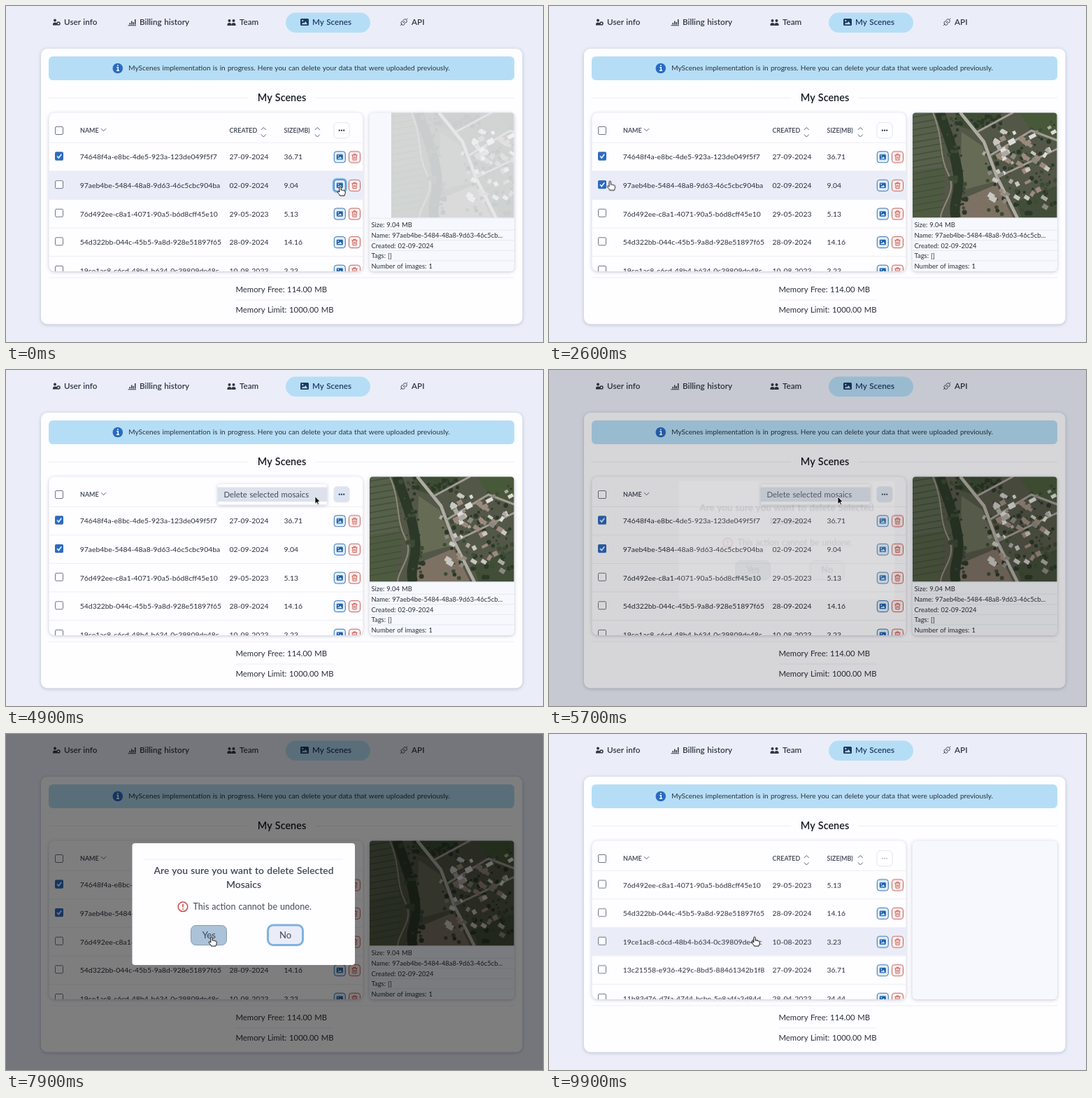
An HTML page for the animation above (10000 ms loop, 768x480 px).

```html
<!DOCTYPE html>
<html lang="en">
<head>
<meta charset="utf-8">
<title>Imagery table</title>
<style>
  html, body { margin: 0; width: 100%; height: 100%; overflow: hidden; background: #ebeef8; }
  svg { display: block; width: 768px; height: 480px; }
  text { font-family: Lato, "Open Sans", sans-serif; fill: #2a303a; word-spacing: .06em; }
  .tab { font-size: 11.7px; font-weight: 600; fill: #2f3744; }
  .on { fill: #1f3a63; }
  .banner { font-size: 10.05px; text-anchor: end; }
  .title { font-size: 14.45px; font-weight: 600; text-anchor: middle; fill: #161a22; }
  .head { font-size: 9px; font-weight: 600; fill: #39414f; }
  .cell { font-size: 10.4px; }
  .mem { font-size: 11.35px; }
  .info { font-size: 9.45px; }
  .ask { font-size: 13.9px; font-weight: 600; text-anchor: middle; fill: #3e4655; }
  .note { font-size: 12.6px; fill: #444c5a; }
  .btn { font-size: 13.1px; text-anchor: middle; fill: #3e4655; }
  .item { font-size: 11.4px; fill: #434c5b; }
  .line { fill: none; stroke: #edeef3; }
  .icon { fill: #2f3744; }
  .sort { fill: none; stroke: #4b5361; stroke-width: .9; }
  .card { filter: drop-shadow(0 1px 2.5px #1e285a40); }

  /* One percent is 100 ms */
  .flip { animation: 10s step-end infinite; }
  .hover1 { animation-name: hover1; }
  .hover2 { animation-name: hover2; }
  .hover3 { animation-name: hover3; }
  .tick0 { animation-name: untilDelete; }
  .tick1 { animation-name: tick1; }
  .focus { animation-name: focus; }
  .untilDelete { animation-name: untilDelete; }
  .afterDelete { animation-name: afterDelete; }
  .untilShift { animation-name: untilShift; }
  .list { animation-name: list; }
  .opened { animation-name: opened; }
  .noRing { animation-name: noRing; }
  .yesRing { animation-name: yesRing; }
  .hand { animation-name: hand; }
  .arrow { animation-name: arrow; }
  .beam { animation-name: beam; }
  .photo { animation: photo 10s infinite; }
  .menu { animation: menu 10s linear infinite; }
  .fade { animation: fade 10s infinite; }
  .pop { animation: pop 10s infinite; transform-origin: 340px 243px; }
  .cursor { animation: move 10s ease-in-out infinite; }

  @keyframes hover1 { 0% { opacity: 0 } 11.5% { opacity: 1 } 16.9% { opacity: 0 } 28% { opacity: 1 } 31.3%, 100% { opacity: 0 } }
  @keyframes hover2 { 0% { opacity: 1 } 11.5% { opacity: 0 } 16.9% { opacity: 1 } 28%, 100% { opacity: 0 } }
  @keyframes hover3 { 0% { opacity: 0 } 88%, 100% { opacity: 1 } }
  @keyframes tick1 { 0% { opacity: 0 } 21% { opacity: 1 } 85%, 100% { opacity: 0 } }
  @keyframes focus { 0% { opacity: 1 } 21%, 100% { opacity: 0 } }
  @keyframes untilDelete { 0% { opacity: 1 } 85%, 100% { opacity: 0 } }
  @keyframes afterDelete { 0% { opacity: 0 } 85%, 100% { opacity: 1 } }
  @keyframes untilShift { 0% { opacity: 1 } 91%, 100% { opacity: 0 } }
  @keyframes list { 0% { transform: none } 91%, 100% { transform: translateY(-81.2px) } }
  @keyframes opened { 0% { opacity: 0 } 41% { opacity: 1 } 59%, 100% { opacity: 0 } }
  @keyframes noRing { 0% { opacity: 0 } 59% { opacity: 1 } 84%, 100% { opacity: 0 } }
  @keyframes yesRing { 0% { opacity: 0 } 84%, 100% { opacity: 1 } }
  @keyframes hand { 0% { opacity: 1 } 45% { opacity: 0 } 69%, 100% { opacity: 1 } }
  @keyframes arrow { 0% { opacity: 0 } 45% { opacity: 1 } 62%, 100% { opacity: 0 } }
  @keyframes beam { 0% { opacity: 0 } 62% { opacity: 1 } 69%, 100% { opacity: 0 } }
  @keyframes photo {
    0% { opacity: .22; transform: translateX(31px); animation-timing-function: ease-out }
    5% { opacity: 1; transform: none; animation-timing-function: step-end }
    85%, 100% { opacity: 0; transform: none }
  }
  @keyframes menu { 0%, 41% { opacity: 0 } 43%, 57.5% { opacity: 1 } 59%, 100% { opacity: 0 } }
  @keyframes fade {
    0%, 56.4% { opacity: 0; animation-timing-function: ease-out }
    59.4%, 84.8% { opacity: 1; animation-timing-function: ease-in }
    87.8%, 100% { opacity: 0 }
  }
  @keyframes pop {
    0%, 56.2% { opacity: 0; transform: scale(.95); animation-timing-function: ease-out }
    59.2%, 84.8% { opacity: 1; transform: none; animation-timing-function: ease-in }
    87.8%, 100% { opacity: 0; transform: scale(.95) }
  }
  @keyframes move {
    0%, 5% { transform: translate(478px, 258px) }
    14%, 16% { transform: translate(93px, 231px) }
    19%, 25% { transform: translate(77px, 252px) }
    34%, 45% { transform: translate(490px, 180px) }
    52%, 59% { transform: translate(413px, 181px) }
    64%, 66% { transform: translate(355px, 249px) }
    73%, 100% { transform: translate(294px, 290px) }
  }
</style>
</head>
<body>
<svg viewBox="0 0 768 480">
  <defs>
    <clipPath id="tableClip"><rect x="61" y="152" width="449.5" height="227" rx="8"/></clipPath>
    <clipPath id="photoClip"><path d="M520 302.5V157q0-4.500 4.500-4.500H722q4.500 0 4.500 4.500V302.500Z"/></clipPath>
    <g id="picture">
      <path d="M1.500 0H10.500Q12 0 12 1.500V8.500Q12 10 10.500 10H1.500Q0 10 0 8.500V1.500Q0 0 1.500 0ZM1.800 8.200H10.200L7.400 4 5.200 6.800 3.900 5.600ZM3.300 1.800A1.100 1.100 0 1 0 3.310 1.800Z" fill-rule="evenodd"/>
    </g>
    <g id="person"><circle cx="3" cy="2" r="2"/><path d="M0 9V7.500Q0 5 3 5T6 7.500V9Z"/></g>
    <g id="sort"><path class="sort" d="M-3.500-1.500 0-5 3.500-1.500M-3.500 5 0 8.500 3.500 5"/></g>
  </defs>

  <rect width="768" height="480" fill="#ebeef8"/>

  <!-- Tabs -->
  <rect x="400" y="9.500" width="121" height="28.500" rx="14.250" fill="#b5def6"/>
  <g class="icon">
    <use href="#person" x="67" y="18.500"/>
    <circle cx="75" cy="25" r="2" fill="none" stroke="#2f3744" stroke-width="1.500"/>
    <path d="M174.500 27.300H186V28.300H174.500ZM176.500 24H178V26.500H176.500ZM179 21.500H180.500V26.500H179ZM181.500 23H183V26.500H181.500ZM184 19H185.500V26.500H184Z"/>
    <use href="#person" x="316.500" y="19"/>
    <use href="#person" x="322.500" y="19"/>
    <use href="#picture" x="421" y="18" fill="#1f3a63"/>
    <path d="M564 28 566.500 25.500M566.500 21.500 570.500 25.500 569 27Q567.500 28 566 26.500T565.200 23ZM568 20.500 569.500 19Q571 18 572.500 19.500T573 23L571.600 24.100ZM572.500 19.500 574.300 17.700" fill="none" stroke="#2f3744" stroke-width=".9"/>
  </g>
  <text class="tab" x="83" y="27.200">User info</text>
  <text class="tab" x="191" y="27.200">Billing history</text>
  <text class="tab" x="334" y="27.200">Team</text>
  <text class="tab on" x="438" y="27.200">My Scenes</text>
  <text class="tab" x="580" y="27.200">API</text>

  <!-- Page card -->
  <rect class="card" x="50" y="61" width="688.500" height="393.500" rx="9" fill="#fefdff"/>
  <rect x="61" y="72" width="666" height="34" rx="6" fill="#b5def6"/>
  <circle cx="159.800" cy="89" r="7.300" fill="#2a6bc2"/>
  <path d="M159 85H160.800M158.300 87.800H160.300V92M158 92.200H162" fill="none" stroke="#fff" stroke-width="1.400"/>
  <text class="banner" x="635" y="92.400">MyScenes implementation is in progress. Here you can delete your data that were uploaded previously.</text>
  <path class="line" d="M61 131.500H346M443 131.500H727M61 388H727M329 420H468"/>
  <text class="title" x="394.500" y="136.300">My Scenes</text>
  <text class="mem" x="328.500" y="409">Memory Free: 114.00 MB</text>
  <text class="mem" x="328.500" y="438">Memory Limit: 1000.00 MB</text>

  <!-- Table -->
  <rect class="card" x="61.500" y="152.500" width="449" height="226.500" rx="8" fill="#fefdff"/>
  <g clip-path="url(#tableClip)">
    <g fill="#eaedf8">
      <rect class="flip hover1" x="61" y="195.500" width="450" height="40"/>
      <rect class="flip hover2" x="61" y="236" width="450" height="40"/>
      <rect class="flip hover3" x="61" y="276.500" width="450" height="40"/>
    </g>
    <path class="line" d="M61 195.200H511M61 235.800H511M61 276.400H511M61 317H511M61 357.600H511"/>
    <svg x="0" y="195" width="768" height="185" viewBox="0 195 768 185"><g id="rows" class="flip list"></g></svg>
    <rect x="70.500" y="172.500" width="11" height="11" rx="1.500" fill="#fff" stroke="#6e7684"/>
    <text class="head" x="106" y="181">NAME</text>
    <path class="sort" d="M136 175.200 139.500 178.700 143 175.200"/>
    <text class="head" x="319.500" y="181">CREATED</text>
    <use href="#sort" x="368.300" y="178.500"/>
    <text class="head" x="397.500" y="181">SIZE(MB)</text>
    <use href="#sort" x="445.300" y="178.500"/>
    <rect x="469" y="166.700" width="22" height="22" rx="4.500" fill="#fff" stroke="#e1e4ec"/>
    <rect class="flip opened" x="469" y="166.700" width="22" height="22" rx="4.500" fill="#dde4f1"/>
    <g fill="#b4b8c1"><circle cx="476.800" cy="177.700" r="1"/><circle cx="480" cy="177.700" r="1"/><circle cx="483.200" cy="177.700" r="1"/></g>
    <g class="flip untilDelete" fill="#2b3340"><circle cx="476.800" cy="177.700" r="1.100"/><circle cx="480" cy="177.700" r="1.100"/><circle cx="483.200" cy="177.700" r="1.100"/></g>
  </g>

  <!-- Preview -->
  <rect class="card" x="519.500" y="152.500" width="207.500" height="226.500" rx="6" fill="#f6f8fd"/>
  <g clip-path="url(#photoClip)"><g id="photo" class="photo"></g></g>
  <g class="flip untilShift">
    <path class="line" style="stroke:#e4e9f1" d="M520 303H727M520 320.200H727M520 334.800H727M520 349.400H727M520 364H727"/>
    <text class="info" x="522.500" y="316.300">Size: 9.04 MB</text>
    <text class="info" x="522.500" y="330.900">Name: 97aeb4be-5484-48a8-9d63-46c5cb...</text>
    <text class="info" x="522.500" y="345.500">Created: 02-09-2024</text>
    <text class="info" x="522.500" y="360">Tags: []</text>
    <text class="info flip untilDelete" x="522.500" y="374.600">Number of images: 1</text>
    <text class="info flip afterDelete" x="522.500" y="374.600">Number of images: 0</text>
  </g>

  <!-- Menu -->
  <g class="menu">
    <rect class="card" x="303" y="163" width="156" height="29.500" rx="3" fill="#fefdff"/>
    <rect x="303" y="167.500" width="156" height="20.500" fill="#dce1ec"/>
    <text class="item" x="311.500" y="181.800">Delete selected mosaics</text>
  </g>

  <!-- Dialog -->
  <rect class="fade" width="768" height="480" fill="#000" fill-opacity=".5"/>
  <g class="fade"><g class="pop">
    <rect x="180.500" y="156" width="318.500" height="174" rx="4" fill="#fefdff"/>
    <path class="line" d="M197 179H482"/>
    <text class="ask" x="340" y="199.800">Are you sure you want to delete Selected</text>
    <text class="ask" x="340" y="220.300">Mosaics</text>
    <circle cx="253" cy="246.800" r="6.800" fill="none" stroke="#c4514a" stroke-width="1.500"/>
    <path d="M253 242.800V247.800M253 249.300V250.900" stroke="#c4514a" stroke-width="1.600"/>
    <text class="note" x="267.500" y="251">This action cannot be undone.</text>
    <rect x="264.500" y="273.500" width="51" height="28" rx="7" fill="#abc2d8" stroke="#8a9bb0"/>
    <rect class="flip yesRing" x="264.500" y="273" width="52" height="28.500" rx="7.500" fill="none" stroke="#6fa8da" stroke-width="2.600"/>
    <text class="btn" x="290.300" y="291.500">Yes</text>
    <rect x="374.500" y="273.500" width="50" height="28" rx="7" fill="#eaedf8" stroke="#a6acb9"/>
    <rect class="flip noRing" x="374.500" y="273" width="50" height="28.500" rx="7.500" fill="none" stroke="#7fb2e0" stroke-width="3"/>
    <text class="btn" x="399.500" y="291.500">No</text>
  </g></g>

  <!-- Pointer -->
  <g class="cursor">
    <path class="flip hand" d="M-1.200 1.200C-1.200-.600 1.200-.600 1.200 1.200V5.200C1.600 4.400 3.300 4.500 3.400 5.600 4 4.900 5.400 5.100 5.500 6.200 6.200 5.700 7.200 6.100 7.200 7.200V9.500C7.200 11 6 11.600 6 13H-.500C-.600 11.600-3 9.500-3.800 8-4.300 6.900-3 6.200-2.200 7L-1.200 8Z" fill="#fff" stroke="#111"/>
    <path class="flip arrow" d="M0 0V10.500L2.400 8.300 3.900 11.700 5.600 11 4.100 7.600H7.300Z" fill="#000" stroke="#fff" stroke-width=".8"/>
    <path class="flip beam" d="M-2.500-6Q0-6 0-4.500 0-6 2.500-6M0-4.500V4.500M-2.500 6Q0 6 0 4.500 0 6 2.500 6M-1.400 1.200H1.400" fill="none" stroke="#111"/>
  </g>
</svg>
<script>
  const mosaics = [
    ["74648f4a-e8bc-4de5-923a-123de049f5f7", "27-09-2024", "36.71"],
    ["97aeb4be-5484-48a8-9d63-46c5cbc904ba", "02-09-2024", "9.04"],
    ["76d492ee-c8a1-4071-90a5-b6d8cff45e10", "29-05-2023", "5.13"],
    ["54d322bb-044c-45b5-9a8d-928e51897f65", "28-09-2024", "14.16"],
    ["19ce1ac8-c6cd-48b4-b634-0c39809de48c", "10-08-2023", "3.23"],
    ["13c21558-e936-429c-8bd5-88461342b1f8", "27-09-2024", "36.71"],
    ["11b83d76-d7fa-4744-bcbe-5e8a4fa3d84d", "28-04-2023", "34.44"],
  ];

  const tick = i => `<g class="flip tick${i}">
    <rect x="70" y="-7" width="12" height="12" rx="2" fill="#2a6bc2"/>
    <path d="M73-1 75.300 1.500 79.300-3.700" fill="none" stroke="#fff" stroke-width="1.500"/></g>`;
  const ring = `<rect class="flip focus" x="468.300" y="-8.700" width="18" height="18" rx="4.500"
    fill="none" stroke="#7db4e6" stroke-width="3"/>`;

  const row = ([name, date, size], i) => `<g transform="translate(0 ${215.5 + 40.6 * i})">
    <rect x="70.500" y="-6.500" width="11" height="11" rx="1.500" fill="#fff" stroke="#6e7684"/>
    ${i < 2 ? tick(i) : ""}
    <text class="cell" x="105.800" y="3.800">${name}</text>
    <text class="cell" x="319.500" y="3.800">${date}</text>
    <text class="cell" x="397.500" y="3.800">${size}</text>
    ${i === 1 ? ring : ""}
    <rect x="469.300" y="-7.700" width="16" height="16" rx="3.500" fill="#e2effa" stroke="#2f6fb3"/>
    <use href="#picture" transform="translate(472.800 -3.500) scale(.75)" fill="#1f5fa8"/>
    <rect x="490.500" y="-7.700" width="16" height="16" rx="3.500" fill="#fdf0ef" stroke="#c4605a"/>
    <path d="M494.500-2.500H502.500M497-2.500V-4H500V-2.500M495.500-2.500 496 4.500H501L501.500-2.500M497.700-.500V2.700M499.300-.500V2.700"
      fill="none" stroke="#c0504a" stroke-width=".9"/></g>`;
  document.getElementById("rows").innerHTML = mosaics.map(row).join("");

  // Aerial view in flat shapes
  let seed = 11;
  const rnd = (a, b) => a + (b - a) * ((seed = (seed * 16807) % 2147483647) / 2147483647);
  const many = (n, make) => Array.from({ length: n }, (_, i) => make(i)).join("");
  const area = (fill, d) => `<path fill="${fill}" d="${d}"/>`;
  const way = (color, width, d) => `<path fill="none" stroke="${color}" stroke-width="${width}" d="${d}"/>`;
  const tree = (x0, x1, y0, y1) =>
    `<circle cx="${rnd(x0, x1)}" cy="${rnd(y0, y1)}" r="${rnd(1.2, 3.6)}" fill="${rnd(0, 1) < .5 ? "#2c3828" : "#3d4b34"}"/>`;
  const roofs = ["#c9c7c2", "#9c8a7e", "#dedcd8", "#8b8882", "#aeaaa3"];
  const house = () => `<rect width="${rnd(4, 11)}" height="${rnd(4, 8)}" fill="${roofs[Math.floor(rnd(0, 5))]}"
    transform="translate(${rnd(622, 718)} ${rnd(172, 282)}) rotate(${rnd(0, 1) < .5 ? 32 : -28})"/>`;

  document.getElementById("photo").innerHTML =
    area("#535747", "M520 152H727V303H520Z") +
    area("#56604b", "M520 152H556L562 230 520 236Z") +
    area("#4f5b41", "M520 238 566 232 556 303H520Z") +
    many(17, i => way("#434f3a", 1.5, `M520 ${150 + i * 9}L566 ${142 + i * 9}`)) +
    way("#8d8979", 2, "M549 152C565 190 557 214 571 240S560 285 560 303") +
    area("#666b55", "M590 180 620 200 640 250 588 264Z") +
    area("#3f4e34", "M580 152H650L612 180 588 172Z") +
    many(60, () => tree(582, 646, 152, 172)) +
    area("#485939", "M672 152H727V188L690 178Z") +
    area("#7d7164", "M590 276 640 255 664 303H586Z") +
    area("#434e39", "M668 280 727 256V303H676Z") +
    way("#2c3828", 14, "M559 152C570 185 581 210 585 240S576 280 582 303") +
    many(45, i => tree(564 + i / 3, 584 + i / 3, 152 + i * 3, 166 + i * 3)) +
    many(110, () => tree(622, 725, 165, 300)) +
    way("#b0aca4", 4.5, "M588 152 622 194 641 245 670 303") +
    way("#a19d95", 3, "M612 180 664 152M641 245 727 204M630 214 690 178 727 192") +
    many(64, house);
</script>
</body>
</html>
```
